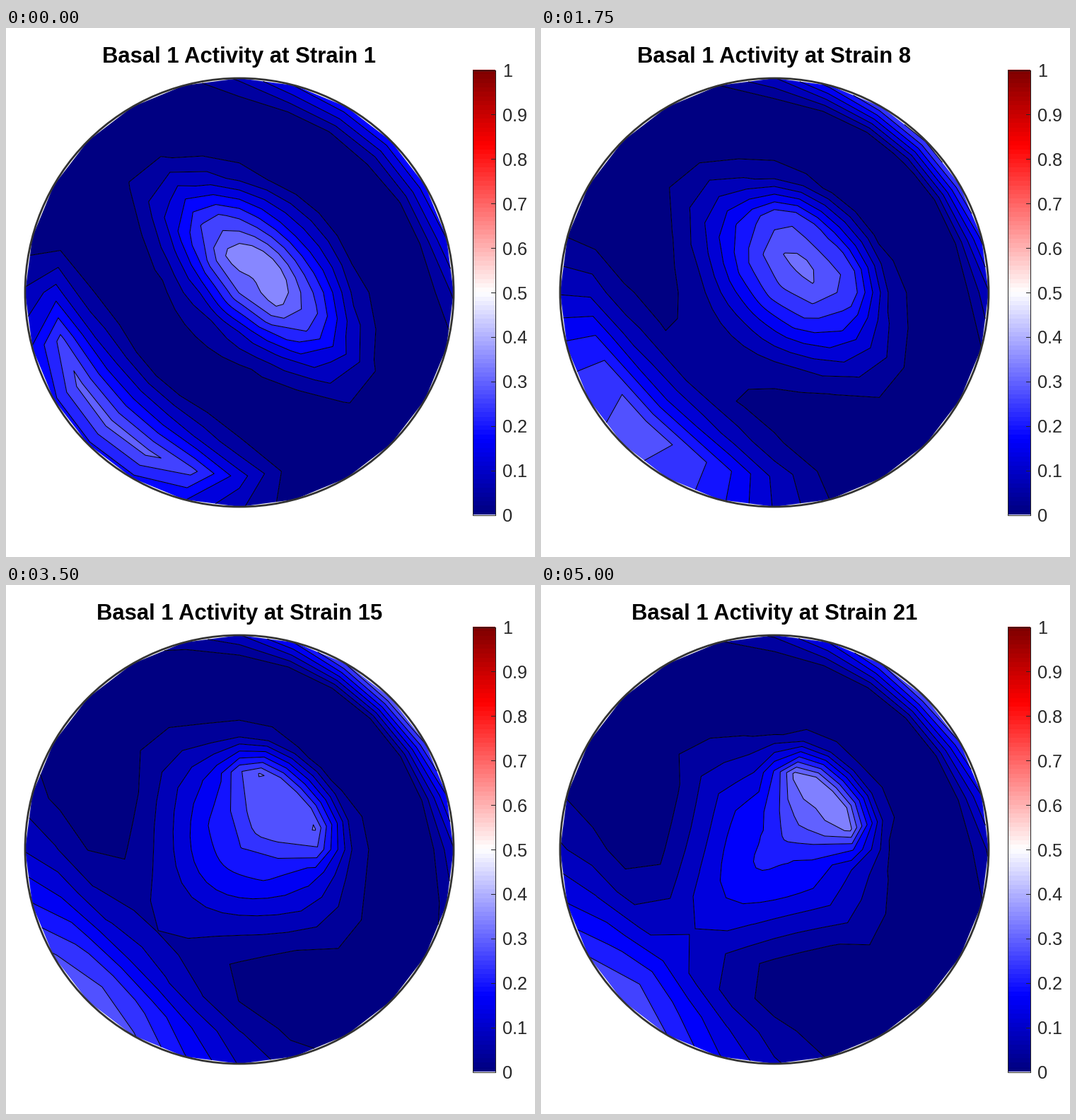
A matplotlib script that plays this animation: 748x748 px, repeating every 5250 ms.

```python
import numpy as np
import matplotlib.pyplot as plt
from matplotlib.animation import FuncAnimation
from matplotlib.colors import LinearSegmentedColormap
from matplotlib.patches import Circle, Rectangle

SIZE, DPI = 748, 100
CX, CY, RADIUS = 330, 374, 303
STRAINS, STEP_MS = 21, 250
INK = "#262626"


def px(n):
    return n * 72 / DPI


plt.rcParams["font.family"] = "Liberation Sans"

# Equal-area projection of a hemisphere, sampled every 15 degrees.
tilt = np.radians(np.arange(0, 91, 15))[:, None]
spoke = np.radians(np.arange(0, 361, 15))[None, :]
ring = RADIUS * np.sqrt(2) * np.sin(tilt / 2)
X, Y = CX + ring * np.sin(spoke), CY - ring * np.cos(spoke)

# Each direction as a latitude along the lower-right diagonal and a roll
# around it; opposite directions are half a turn of roll apart.
diagonal = spoke - np.radians(45)
across = np.sin(tilt) * np.cos(diagonal)
along = np.sin(tilt) * np.sin(diagonal)
LAT = np.degrees(np.arcsin(along))
ROLL = np.degrees(np.arctan2(across, np.cos(tilt)))


def bump(amp, centre, below, above, width, power=2, taper=0):
    """Lopsided bell in roll times a bell in latitude."""
    d = (ROLL - centre + 90) % 180 - 90
    bell = np.exp(-(d / np.where(d < 0, below, above)) ** 2)
    width = width * np.exp(taper * np.minimum(d, 0))
    return amp * bell * np.exp(-np.abs(LAT / width) ** power)


def field(strain):
    """Activity in contour steps."""
    def key(first, middle, last):
        return np.interp(strain, (1, 12, 21), (first, middle, last))

    core = bump(key(9.3, 6.3, 5.3), key(11, 8, 0), key(21, 29, 48),
                key(21, 24, 31), key(44, 44, 40), taper=key(0, 0.006, 0.016))
    crescent = bump(key(0, 5, 7.6), key(25, 25, 26), 11.5, 11.5,
                    key(29, 29, 21), power=4)
    rim = bump(key(7.4, 8.6, 6.8), key(-76, -90, -90), key(21, 10, 10),
               key(21, 34, 30), key(48, 46, 42), power=key(4, 2, 2))
    return core + crescent + rim, key(0.0425, 0.0378, 0.0418)


cmap = LinearSegmentedColormap.from_list("activity", [
    (0, (0, 0, 0.51)), (1 / 6, (0, 0, 1)), (0.5, (1, 1, 1)),
    (5 / 6, (1, 0, 0)), (1, (0.5, 0, 0))], N=100)

fig = plt.figure(figsize=(SIZE / DPI, SIZE / DPI), dpi=DPI, facecolor="white")
ax = fig.add_axes([0, 0, 1, 1])
ax.axis("off")

ax.add_patch(Circle((CX, CY), RADIUS, fill=False, ec="#333333",
                    lw=px(2.8), zorder=5))
title = ax.text(CX, 49, "", size=px(31), weight="bold", color="black",
                ha="center", va="baseline")

# Colour bar
LEFT, RIGHT, TOP, BOTTOM = 660.5, 692.5, 59.5, 688.5
ax.imshow(np.linspace(1, 0, 100)[:, None], cmap=cmap, aspect="auto",
          extent=(LEFT, RIGHT, BOTTOM, TOP), interpolation="nearest")
ax.set_xlim(0, SIZE)
ax.set_ylim(SIZE, 0)
ax.add_patch(Rectangle((LEFT, TOP), RIGHT - LEFT, BOTTOM - TOP, fill=False,
                       ec=INK, lw=px(1), zorder=5))
for n in range(11):
    y = BOTTOM + (TOP - BOTTOM) * n / 10
    ax.plot([RIGHT - 6, RIGHT], [y, y], color=INK, lw=px(1), zorder=5)
    ax.text(702, y + 9.5, f"{n / 10:g}", size=px(25.3), color=INK,
            va="baseline")

LEVELS = np.arange(1, 9)
drawn = []


def clear():
    while drawn:
        drawn.pop().remove()
    return []


def draw(i):
    clear()
    strain = i + 1
    z, step = field(strain)
    colors = [cmap(n * step) for n in range(9)]
    drawn.append(ax.contourf(X, Y, z, levels=[-1, *LEVELS, 20],
                             colors=colors, antialiased=True, zorder=2))
    drawn.append(ax.contour(X, Y, z, levels=LEVELS, colors="black",
                            linewidths=px(1), zorder=3))
    title.set_text(f"Basal 1 Activity at Strain {strain}")
    return []


anim = FuncAnimation(fig, draw, frames=STRAINS, init_func=clear,
                     interval=STEP_MS, repeat=True, repeat_delay=0)
plt.show()
```
